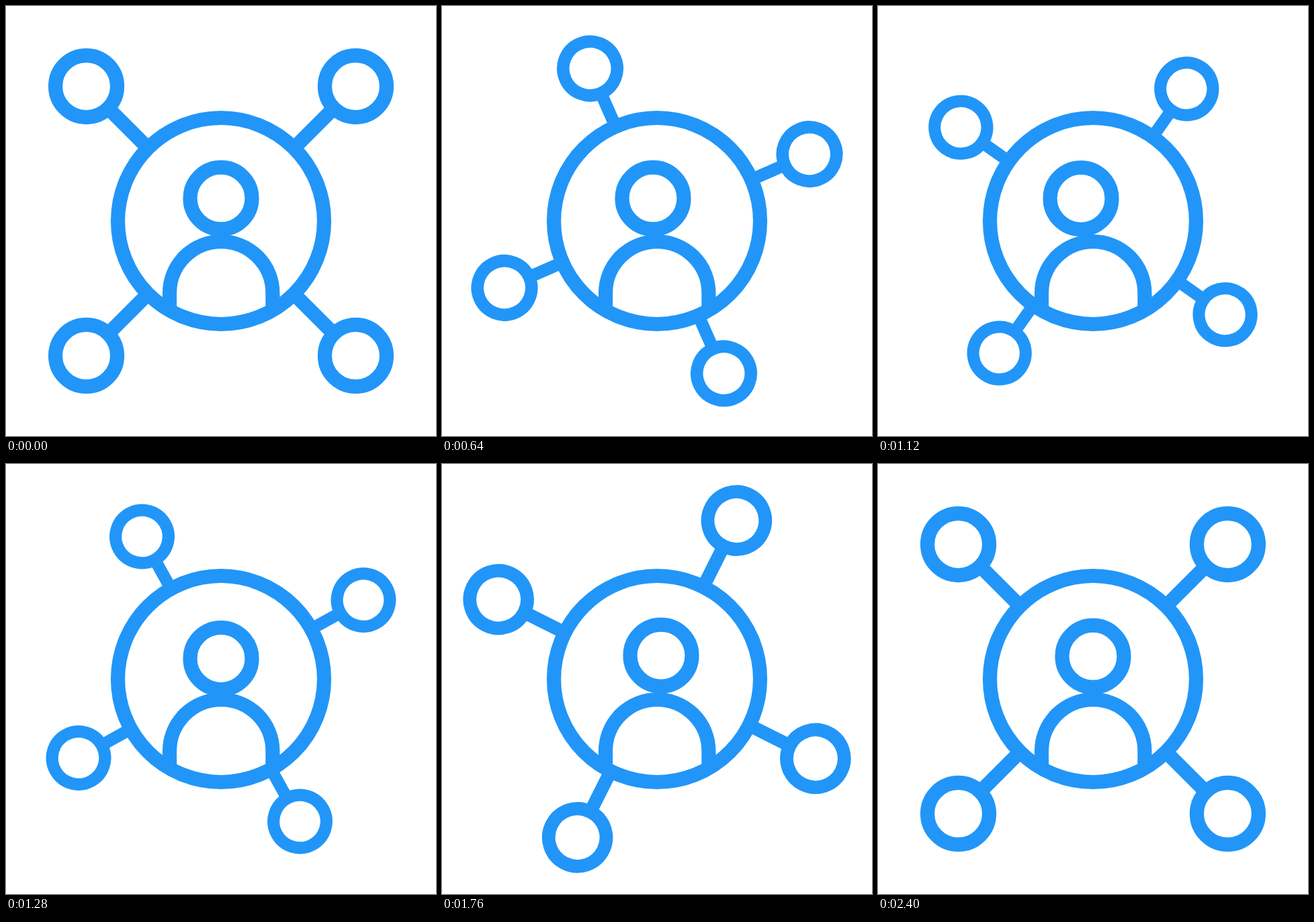
An HTML page for the animation above (2.48 s loop, 640 px wide and 640 px high).

```html
<!DOCTYPE html>
<html lang="en">
<head>
<meta charset="utf-8">
<title>Connected profile</title>
<style>
  html, body { margin: 0; width: 100%; height: 100%; overflow: hidden; background: #fff; }
  svg { display: block; width: 100%; height: 100%; }
  .ink { fill: none; stroke: #2196f8; stroke-width: 21.2; }
  .disc { fill: #fff; }
</style>
</head>
<body>
<svg viewBox="0 0 640 640">
  <defs>
    <g id="node">
      <path d="M0 -155V-238" />
      <circle cy="-283.5" r="46" />
    </g>
  </defs>
  <g class="ink">
    <g id="orbit" transform="translate(320 320)">
      <use href="#node" transform="rotate(45)" />
      <use href="#node" transform="rotate(135)" />
      <use href="#node" transform="rotate(225)" />
      <use href="#node" transform="rotate(315)" />
    </g>
    <circle class="disc" cx="320" cy="320" r="153.5" />
    <path d="M243.5 450V427.3A76.7 76.7 0 0 1 396.9 427.3V450" />
    <circle id="head" cx="320" cy="286.2" r="46" />
  </g>
</svg>
<script>
  const LOOP = 2480, STEP = 40, END = 2400;
  const orbit = document.getElementById('orbit');
  const head = document.getElementById('head');

  // Time (ms), angle (deg), speed (deg per ms)
  const spin = [
    [0, 0, 0], [320, 4.58, .0306], [640, 21.33, .0781], [960, 56, .1409],
    [1280, 106, .158], [1760, 161.66, .065], [2400, 180, 0]
  ];

  function angleAt(t) {
    const i = Math.max(1, spin.findIndex(k => k[0] >= t));
    const [t0, a0, v0] = spin[i - 1], [t1, a1, v1] = spin[i];
    const d = t1 - t0, u = (t - t0) / d, w = 1 - u;
    return a0 + (a1 - a0) * u * u * (3 - 2 * u) + d * u * w * (v0 * w - v1 * u);
  }

  // cubic-bezier(.5, 0, .5, 1) between two times
  function ease(t, from, to) {
    const x = Math.min(1, Math.max(0, (t - from) / (to - from)));
    let lo = 0, hi = 1;
    for (let i = 0; i < 24; i++) {
      const s = (lo + hi) / 2;
      if (1.5 * s * (1 - s) + s ** 3 < x) lo = s; else hi = s;
    }
    return lo * lo * (3 - 2 * lo);
  }

  function draw(t) {
    const scale = 1 - .15 * (ease(t, 34, 901) - ease(t, 1091, 2378));
    orbit.setAttribute('transform',
      `translate(320 320) rotate(${angleAt(t)}) scale(${scale})`);

    const left = ease(t, 463, 901);
    const right = ease(t, 1061, 1499);
    const back = ease(t, 1499, 1937);
    const x = 19 * (2 * right - left - back);
    const y = 3.3 * Math.sin(Math.PI * right) - 1.4 * Math.sin(Math.PI * back);
    head.setAttribute('transform', `translate(${x} ${y})`);
  }

  const start = performance.now();
  function tick() {
    const t = (performance.now() - start) % LOOP;
    draw(Math.min(END, Math.floor((t + 1) / STEP) * STEP));
    requestAnimationFrame(tick);
  }
  tick();
</script>
</body>
</html>
```
